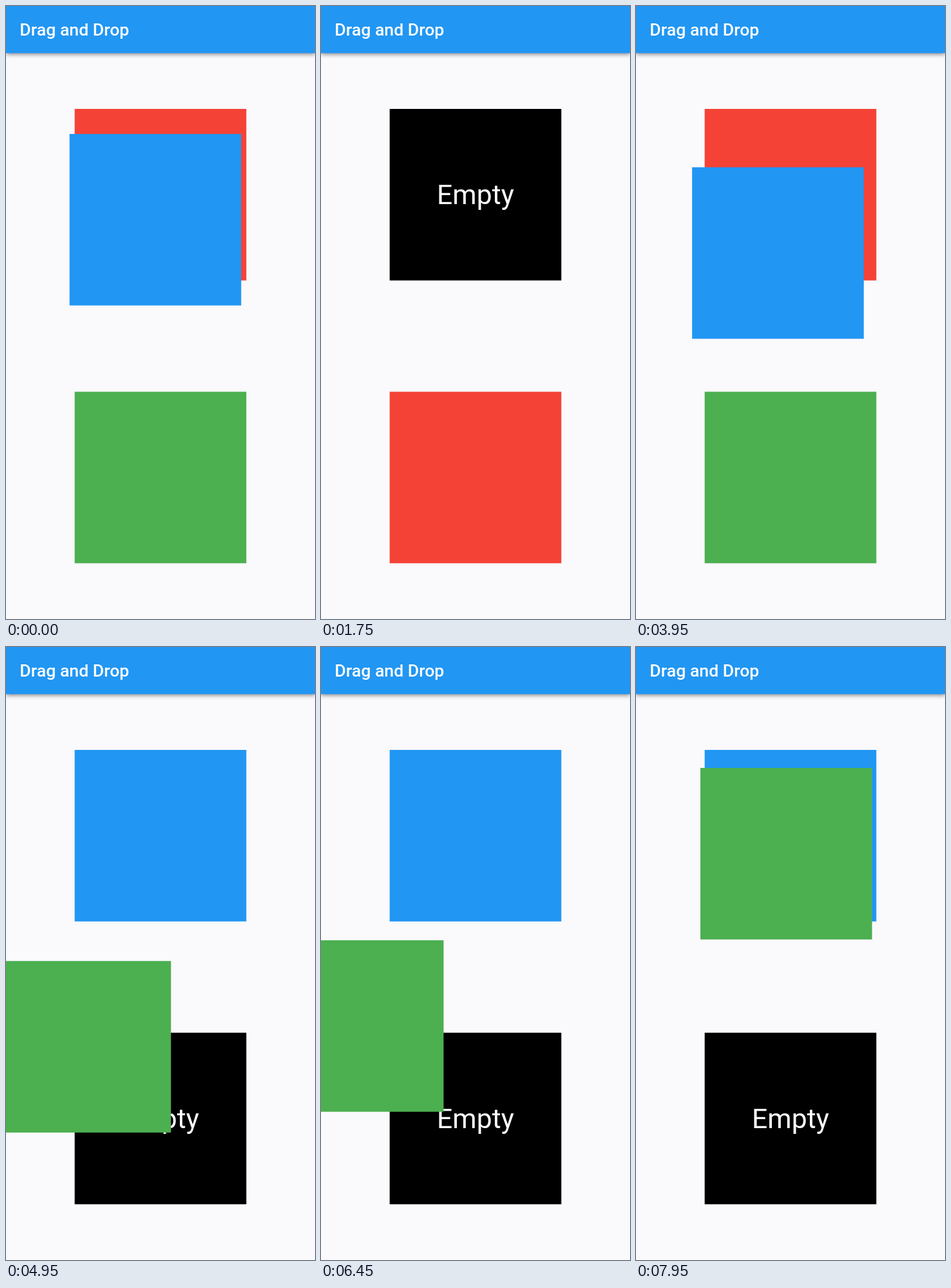
An HTML page for the animation above (8 s loop, 480 px wide and 953 px high).

```html
<!DOCTYPE html>
<html lang="en">
<head>
<meta charset="utf-8">
<title>Drag and Drop</title>
<style>
  html, body { margin: 0; width: 100%; height: 100%; overflow: hidden; background: #faf9fc; }
  svg { display: block; width: 100vw; height: 100vh; }
  text { font-family: Roboto, sans-serif; fill: #fff; }
  .bar { fill: #2196f3; filter: drop-shadow(0 2px 3px rgba(0, 0, 0, .45)); }
  .title { font-size: 26.67px; font-weight: 500; }
  .empty { font-size: 42.67px; text-anchor: middle; }
</style>
</head>
<body>
<svg viewBox="0 0 480 953">
  <rect class="bar" width="480" height="73.3"/>
  <text class="title" x="21.3" y="46">Drag and Drop</text>
  <g id="top" transform="translate(106.67 160)">
    <rect width="266.67" height="266.67"/>
    <text class="empty" x="133.33" y="148">Empty</text>
  </g>
  <g id="bottom" transform="translate(106.67 599.67)">
    <rect width="266.67" height="266.67"/>
    <text class="empty" x="133.33" y="148">Empty</text>
  </g>
  <rect id="held" width="266.67" height="266.67"/>
</svg>
<script>
const LOOP = 8000, STEP = 50;
const COLORS = { red: '#f44336', green: '#4caf50', blue: '#2196f3' };
const HOME = { top: [106.67, 160], bottom: [106.67, 599.67] };

// Each drag: slots, start / rest / drop times, bend point, end point, quickness
const DRAGS = [
  { from: 'top', to: 'bottom', t0: -125, t1: 500, drop: 550, bend: [64, 347], end: [105, 534] },
  { from: 'top', to: 'bottom', t0: 850, t1: 1700, drop: 1750, bend: [66, 357], end: [118.3, 554.5] },
  { from: 'bottom', to: 'top', t0: 2150, t1: 2950, drop: 3000, bend: [36, 393], end: [100, 186] },
  { from: 'bottom', to: 'top', t0: 3350, t1: 4150, drop: 4200, bend: [48, 393], end: [101, 186] },
  { from: 'bottom', to: 'bottom', t0: 4650, t1: 5500, drop: 5600, bend: [2, 500], end: [-103, 400], quick: 1.78 },
  { from: 'bottom', to: 'bottom', t0: 5950, t1: 6700, drop: 6900, bend: [1, 516], end: [-106, 432.7], quick: 1.32 },
  { from: 'bottom', to: 'top', t0: 7100, t1: 7950, drop: 8000, bend: [68, 394], end: [100, 188] }
];

const el = id => document.getElementById(id);
const held = el('held');

function place(drag, t) {
  const u = Math.min(1, (t - drag.t0) / (drag.t1 - drag.t0));
  const v = 1 - (1 - u) ** (drag.quick || 1);
  const s = v * v * (3 - 2 * v), r = 1 - s;
  return HOME[drag.from].map((a, i) => r * r * a + 2 * r * s * drag.bend[i] + s * s * drag.end[i]);
}

function paintSlot(id, stack) {
  const [box, label] = el(id).children;
  const color = stack[stack.length - 1];
  box.setAttribute('fill', color ? COLORS[color] : '#000');
  label.style.display = color ? 'none' : '';
}

function draw(t) {
  const stacks = { top: ['red', 'blue'], bottom: ['green'] };
  held.style.display = 'none';
  for (const drag of DRAGS) {
    if (t <= drag.t0) break;
    const color = stacks[drag.from].pop();
    if (t >= drag.drop) {
      stacks[drag.to].push(color);
    } else {
      const [x, y] = place(drag, t);
      held.style.display = '';
      held.setAttribute('fill', COLORS[color]);
      held.setAttribute('x', x.toFixed(2));
      held.setAttribute('y', y.toFixed(2));
    }
  }
  paintSlot('top', stacks.top);
  paintSlot('bottom', stacks.bottom);
}

const begin = performance.now();
function tick() {
  const t = (performance.now() - begin) % LOOP;
  draw(Math.floor(t / STEP) * STEP);
  requestAnimationFrame(tick);
}
draw(0);
requestAnimationFrame(tick);
</script>
</body>
</html>
```
